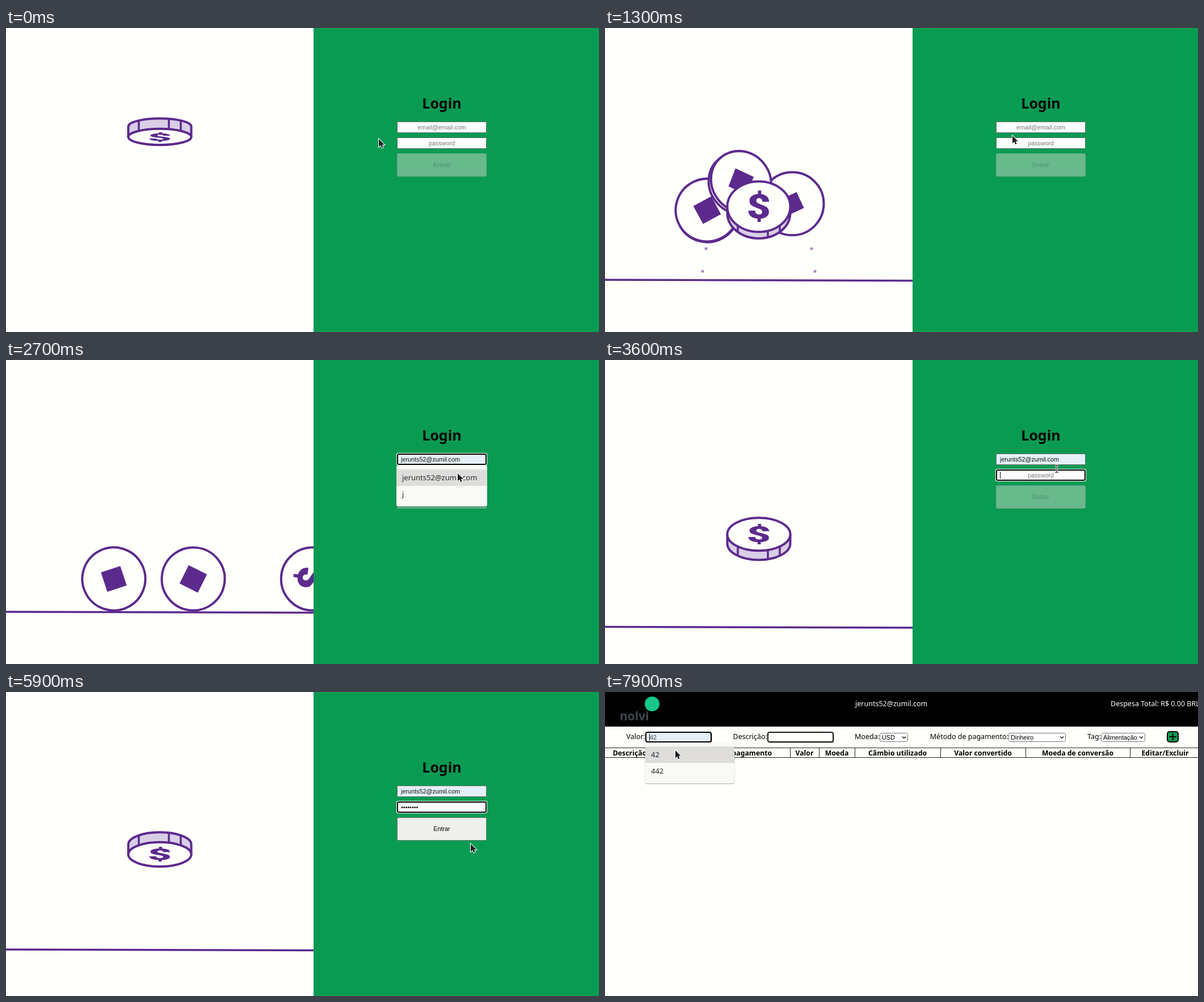
An HTML page with a canvas for the animation above (8 s loop, 1045 by 536 pixels).

```html
<!DOCTYPE html>
<html lang="pt-BR">
<head>
<meta charset="utf-8">
<title>Login</title>
<style>
html, body { margin: 0; width: 100%; height: 100%; overflow: hidden; background: #fffffc; }
canvas { display: block; width: 100%; height: 100%; }
</style>
</head>
<body>
<canvas id="stage" width="1045" height="536"></canvas>
<script>
const ctx = document.getElementById('stage').getContext('2d');
const LOOP = 8000, STEP = 100, CYCLE = 5150;
const PAPER = '#fffffc', GREEN = '#0a9b52', PURPLE = '#5c2a8c', RIM = '#d9cee6', AUTOFILL = '#e4f0f8';
const UI = '"Noto Sans", sans-serif', FORM = '"Liberation Sans", Arial, sans-serif';
const FIELD = '10.8px ' + FORM, LABEL = '12.5px ' + UI, ITEM = '500 13px ' + UI;
const USER = 'jerunts52@zumil.com';
const SAVED = ['tirenaskl@zumil.com', USER, 'j', 'drbnlt_pelvanso@valun.com.br',
  'sibelanorvatilda68@zumil.com', 'zelkor_dorintel@valun.com.br'];
const R = 55.5, CENTER = 271, GROUND = 386, LAUNCH = 1040, LANDED = 2000, GONE = 3200;

const clamp = p => Math.min(1, Math.max(0, p));
const smooth = p => (p = clamp(p), p * p * (3 - 2 * p));
const bump = (t, a, b) => Math.sin(Math.PI * clamp((t - a) / (b - a)));
const within = (t, a, b) => t >= a && t < b;

// Moves through time, value pairs; `ease` shapes each stretch.
function tween(t, ease, first, ...rest) {
  let [t0, v] = first;
  for (const [t1, v1] of rest) {
    if (t > t0) v += (v1 - v) * ease((t - t0) / (t1 - t0));
    t0 = t1;
  }
  return v;
}

function text(s, x, y, font, color, align = 'left') {
  ctx.font = font;
  ctx.fillStyle = color;
  ctx.textAlign = align;
  ctx.fillText(s, x, y);
}
function rect(x, y, w, h, color) {
  ctx.fillStyle = color;
  ctx.fillRect(x, y, w, h);
}
function disc(x, y, r, color) {
  ctx.fillStyle = color;
  ctx.beginPath();
  ctx.arc(x, y, r, 0, 7);
  ctx.fill();
}
function box(x, y, w, h, r, fill, stroke, lw = 1) {
  ctx.beginPath();
  ctx.roundRect(x, y, w, h, r);
  if (fill) { ctx.fillStyle = fill; ctx.fill(); }
  if (stroke) { ctx.strokeStyle = stroke; ctx.lineWidth = lw; ctx.stroke(); }
}
function line(x1, y1, x2, y2, color, lw) {
  ctx.strokeStyle = color;
  ctx.lineWidth = lw;
  ctx.beginPath();
  ctx.moveTo(x1, y1);
  ctx.lineTo(x2, y2);
  ctx.stroke();
}

// A coin turned by `turn`, tipped by `tilt`, its face spun by `spin`.
function coin(x, y, { turn = 0, tilt = 0, spin = 0, stretch = 1, mark = 0 }) {
  const side = tilt - Math.PI * Math.round(tilt / Math.PI);
  const flat = Math.max(0.02, Math.cos(side)) * stretch, ry = R * flat;
  const d = (mark ? 14 : 19) * Math.sin(side), dir = Math.sign(d);
  ctx.save();
  ctx.translate(x, y);
  ctx.rotate(turn);
  ctx.lineWidth = 4;
  ctx.strokeStyle = PURPLE;
  if (Math.abs(d) > 1) {
    ctx.fillStyle = mark ? PAPER : RIM;
    ctx.beginPath();
    ctx.moveTo(-R, 0);
    ctx.lineTo(-R, d);
    ctx.ellipse(0, d, R, ry, 0, Math.PI, 0, dir > 0);
    ctx.lineTo(R, 0);
    ctx.fill();
    ctx.stroke();
    for (const tx of mark ? [] : [-37, 16, 37]) {
      const ty = dir * ry * Math.sqrt(1 - tx * tx / R / R);
      line(tx, ty, tx, ty + d, PURPLE, 3.5);
    }
    ctx.lineWidth = 4;
  }
  ctx.fillStyle = PAPER;
  ctx.beginPath();
  ctx.ellipse(0, 0, R, ry, 0, 0, 7);
  ctx.fill();
  ctx.stroke();
  ctx.scale(1, flat);
  ctx.rotate(spin);
  if (mark) rect(-mark / 2, -mark / 2, mark, mark, PURPLE);
  else text('$', 0, 26, '900 73px Roboto, sans-serif', PURPLE, 'center');
  ctx.restore();
}

// Thrown out from behind the dollar, then rolling to `reach` and on to `exit`.
function sideCoin(u, { vx, vy, reach, exit, turn, wobble, mark }) {
  const s = Math.min(u, LANDED) - LAUNCH;
  const x = tween(u, smooth, [LANDED, CENTER + vx * s], [2700, reach], [GONE, exit]);
  const y = Math.min(GROUND, 315 + vy * s + 0.000378 * s * s);
  const tilt = tween(u, clamp, [LAUNCH, 0], [1800, wobble], [LANDED, 0]);
  coin(x, y, { turn, tilt, spin: (x - 180) / R, mark });
  return x;
}

function coins(u) {
  ctx.save();
  ctx.beginPath();
  ctx.rect(0, 0, 542, 536);
  ctx.clip();
  const rise = clamp((1000 - u) / 800), sink = clamp((u - 3300) / 600);
  const floor = 444 + 103 * rise ** 2 + 106 * sink ** 2 + (u < 200 ? 50 : 0);
  line(0, floor, 542, floor + 1.5, PURPLE, 3.5);

  if (within(u, LAUNCH, GONE)) {
    sideCoin(u, { vx: -0.35, vy: -0.075, reach: 190, exit: -70, turn: -0.5, wobble: 0.3, mark: 36 });
    const ex = sideCoin(u, { vx: 0.227, vy: -0.118, reach: 610, exit: 610, turn: 0, wobble: 0, mark: 31 });
    sideCoin(u, { vx: -0.12, vy: -0.268, reach: 330, exit: -70, turn: 0.9, wobble: 1.14, mark: 36 });
    if (within(u, 1700, 1900))
      for (const k of [-1, 1]) line(ex + 56 * k, 431, ex + 47 * k, 438, PURPLE, 2.5);
  }

  const x = CENTER + 288 * bump(u, 1900, GONE);
  const y = tween(u, smooth, [0, 192], [250, 55], [880, 315], [1400, 315], [1950, GROUND],
    [GONE, GROUND], [4450, 60], [CYCLE, 192]);
  const tilt = tween(u, clamp, [0, 1.83], [750, 5.11], [1300, 6.92], [1800, 6.283], [GONE, 6.283], [CYCLE, 11.255]);
  coin(x, y, { tilt, spin: (x - CENTER) / R, stretch: 1 + 0.07 * bump(u, 1500, 2100) });

  if (within(u, 1100, 1600))
    for (let i = 0; i < 4; i++) {
      const side = i % 2 ? 1 : -1, row = i >> 1;
      disc(CENTER + side * (93 + 6 * row + 0.08 * (u - 1300)), 389 + 40 * row, 2.6, '#a98bc4');
    }
  ctx.restore();
}

function caret(x, y, since) {
  if (Math.floor(since / 500) % 2 === 0) line(x, y - 6, x, y + 6, '#000', 1);
}

function field(y, { value, hint, focus, fill = '#fff' }) {
  if (focus) {
    box(688, y - 1, 160, 22, 3, '#fff');
    box(690, y + 1, 156, 18, 2, fill, '#000', 2);
  } else box(689.5, y + 0.5, 157, 19, 0, fill, '#66706a');
  if (value) text(value, 696, y + 14, FIELD, '#111');
  else text(hint, 768, y + 14, FIELD, '#757575', 'center');
}

function menu(x, y, w, items, hover) {
  ctx.save();
  ctx.shadowColor = 'rgba(0,0,0,.35)';
  ctx.shadowBlur = 2;
  ctx.shadowOffsetY = 1;
  box(x, y, w, items.length * 29 + 14, 3, '#f9f9f6');
  ctx.restore();
  if (hover) rect(x, y + 7, w, 29, '#dedddb');
  items.forEach((s, i) => text(s, x + 10, y + 26 + i * 29.2, ITEM, '#2b2b2b'));
}

function login(t, over) {
  rect(542, 0, 503, 536, GREEN);
  coins(t % CYCLE);
  text('Login', 768, 142, 'bold 25px ' + UI, '#000', 'center');

  const onEmail = within(t, 1600, 3400), onPass = within(t, 3400, 6200);
  const typed = Math.max(0, Math.min(8, Math.floor((t - 4200) / 160) + 1));
  const ready = typed >= 6, hovered = over(689, 221, 158, 41);
  const email = t < 2500 ? '' : t < 2700 ? 'j' : USER;
  const dots = '•'.repeat(typed);

  field(165, { value: email, hint: 'email@email.com', focus: onEmail, fill: t < 2700 ? '#fff' : AUTOFILL });
  field(193, { value: dots, hint: 'password', focus: onPass });
  if (ready) box(689.5, 221.5, 157, 40, 2, hovered ? '#e5e5e5' : '#efefec', '#777');
  else box(689.5, 221.5, 157, 40, 2, '#68b98c', '#73a488');
  text('Entrar', 768, 245, FIELD, ready ? '#000' : '#4c9069', 'center');

  ctx.font = FIELD;
  if (onEmail && t < 2700) caret(696.5 + ctx.measureText(email).width, 175, t < 2500 ? t - 1600 : 0);
  if (onPass) caret(696.5 + ctx.measureText(dots).width, 203, within(t, 4200, 5300) ? 0 : t - (t < 4200 ? 3400 : 5300));

  if (within(t, 1700, 2500)) menu(688, 186, 225, SAVED);
  if (within(t, 2500, 3000)) menu(688, 186, 160, [USER, 'j'], t >= 2700);
}

function entry(x, focus, fill) {
  box(x + 2, 72, 116, 18, 4, '#b5b5ae');
  box(x + 1, 71, 115, 17, 3, fill, focus ? '#000' : '#1c1c1c', 2);
}
function select(x, w, value) {
  box(x + 0.5, 72.5, w, 15, 3, '#fff', '#767676');
  text(value, x + 4, 84, FIELD, '#000');
  line(x + w - 9, 78.5, x + w - 5.7, 81.8, '#222', 1.5);
  line(x + w - 6.3, 81.8, x + w - 3, 78.5, '#222', 1.5);
}

function wallet(t) {
  rect(0, 0, 1045, 61, '#000');
  disc(83, 21, 13, '#17c989');
  text('nolvi', 26, 50, 'bold 21px ' + UI, '#42474f');
  text(USER, 441, 25, LABEL, '#fff');
  text('Despesa Total: R$ 0.00 BRL', 891, 25, LABEL, '#fff');

  const labels = [['Valor:', 71], ['Descrição:', 286], ['Moeda:', 484], ['Método de pagamento:', 711], ['Tag:', 874]];
  for (const [s, x] of labels) text(s, x, 83, LABEL, '#000', 'right');
  const focus = t >= 7300, hover = t >= 7700;
  entry(71, focus, hover ? AUTOFILL : '#fff');
  entry(286, false, PAPER);
  select(484, 49, 'USD');
  select(711, 100, 'Dinheiro');
  select(874, 77, 'Alimentação');
  box(991, 70, 19, 18, 4, GREEN, '#000', 2);
  line(994.5, 79, 1006.5, 79, '#000', 2);
  line(1000.5, 73, 1000.5, 85, '#000', 2);

  // Each column has its heading and its width.
  const columns = [['Descrição', 87], ['Tag', 36], ['Método de pagamento', 203], ['Valor', 51], ['Moeda', 63],
    ['Câmbio utilizado', 151], ['Valor convertido', 150], ['Moeda de conversão', 184], ['Editar/Excluir', 124]];
  rect(0, 98, 1045, 1, '#222');
  rect(0, 115, 1045, 1, '#222');
  let x = 0;
  for (const [head, w] of columns) {
    text(head, x + w / 2, 112, 'bold 12.3px ' + UI, '#000', 'center');
    rect(x += w, 98, 1, 18, '#222');
  }

  if (hover) text('42', 79, 84, FIELD, '#444');
  if (focus) caret(78.5, 79.5, 0);
  if (t >= 7500) menu(71, 89, 157, ['42', '442'], hover);
}

// Where the pointer heads, and when it sets off.
const STOPS = [[800, 718, 190], [1300, 723, 177], [2500, 796, 200], [3100, 796, 192], [5500, 819, 268],
  [5900, 790, 243], [6300, 668, 241], [6900, 127, 80], [7500, 124, 103]];

function pointerAt(t) {
  let x = 657, y = 196;
  for (const [start, sx, sy] of STOPS) {
    const p = smooth((t - start) / 200);
    x += (sx - x) * p;
    y += (sy - y) * p;
  }
  return [x, y];
}

function pointer(x, y, beam) {
  ctx.save();
  ctx.translate(x, y);
  if (beam) {
    for (const [color, lw] of [['#fff', 3], ['#222', 1.2]]) {
      line(0, -6, 0, 6, color, lw);
      line(-3, -6, 3, -6, color, lw);
      line(-3, 6, 3, 6, color, lw);
    }
  } else {
    const p = new Path2D('M0 0V13.5L3.2 10.6L5.3 15.2L7.6 14.1L5.6 9.8H9.8Z');
    ctx.strokeStyle = '#fff';
    ctx.lineWidth = 2;
    ctx.stroke(p);
    ctx.fillStyle = '#1c1c1c';
    ctx.fill(p);
  }
  ctx.restore();
}

function frame(now) {
  const t = Math.floor(now % LOOP / STEP) * STEP;
  const [px, py] = pointerAt(t);
  const over = (x, y, w, h) => px >= x && px < x + w && py >= y && py < y + h;
  const inLogin = t < 6400, menuOpen = within(t, 1700, 3000);
  const beam = inLogin
    ? over(689, 165, 158, 20) || !menuOpen && over(689, 191, 158, 22)
    : over(71, 71, 116, 18);
  rect(0, 0, 1045, 536, PAPER);
  if (inLogin) login(t, over);
  else wallet(t);
  pointer(px, py, beam);
  requestAnimationFrame(() => frame(performance.now() - start));
}
const start = performance.now();
frame(0);
</script>
</body>
</html>
```
